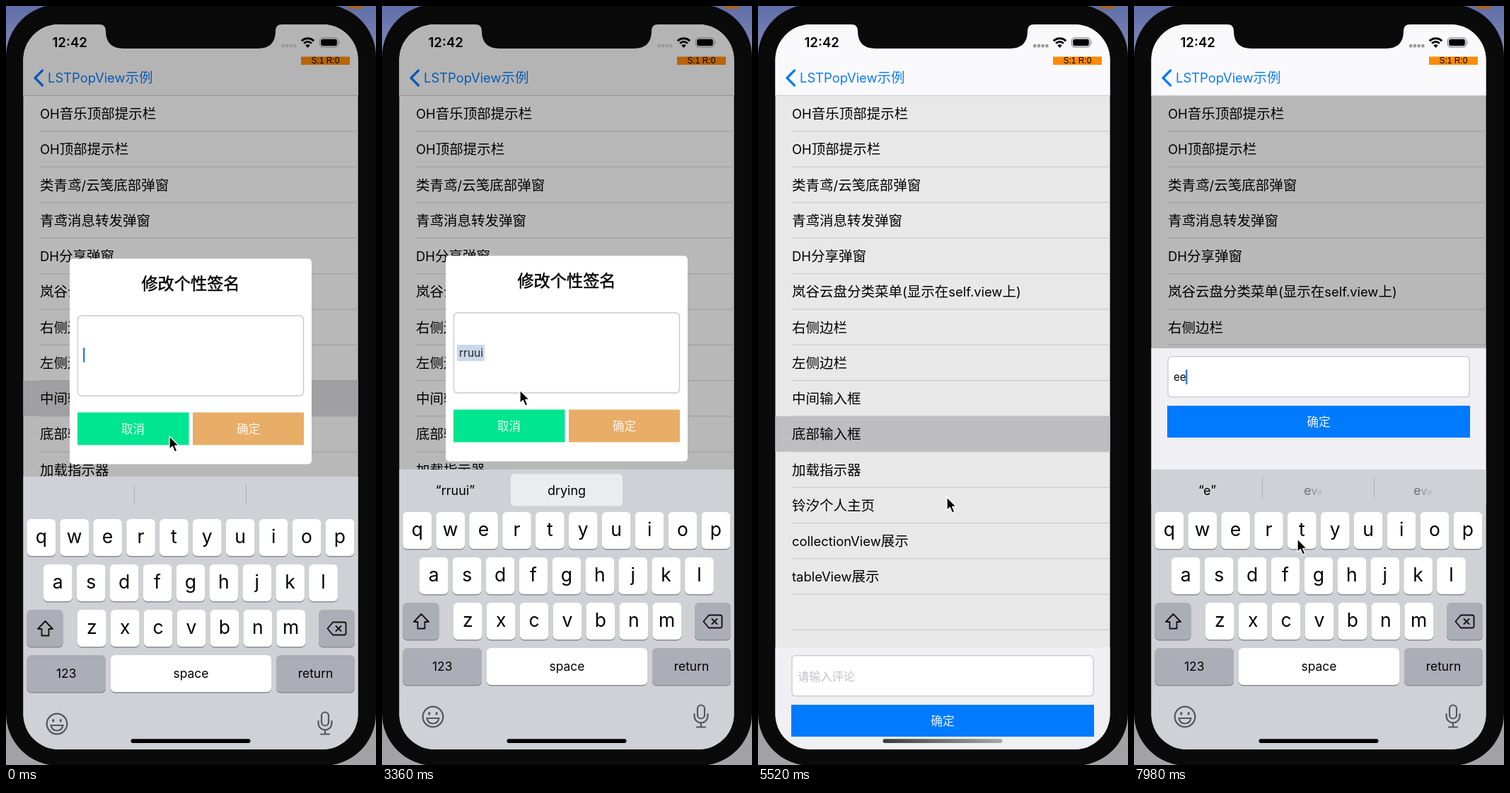
Recreate the animation shown at these times as an HTML page. Size 523x1071 px, loop 8 s.

```html
<!DOCTYPE html>
<html lang="zh-CN">
<head>
<meta charset="utf-8">
<style>
html, body { margin: 0; width: 100%; height: 100%; overflow: hidden; background: #0a0a0a; }
svg { display: block; width: 523px; height: 1071px; }
text { font-family: Inter, "Noto Sans CJK SC", "Noto Sans CJK", "Noto Sans CJK JP", sans-serif; white-space: pre; }
.debug { font-family: "Liberation Sans", Arial, sans-serif; }
</style>
</head>
<body>
<svg id="stage" viewBox="0 0 523 1071" xmlns="http://www.w3.org/2000/svg"></svg>
<script>
const LOOP = 8000, STEP = 60;
const ROW_TOP = 126.5, ROW_H = 50.25, KB_H = 395, DIM = 0.28;

const rows = [
  'OH音乐顶部提示栏', 'OH顶部提示栏', '类青鸢/云笺底部弹窗', '青鸢消息转发弹窗', 'DH分享弹窗',
  '岚谷云盘分类菜单(显示在self.view上)', '右侧边栏', '左侧边栏', '中间输入框', '底部输入框',
  '加载指示器', '铃汐个人主页', 'collectionView展示', 'tableView展示'
];

// time, x, y of the pointer tip
const pointerPath = [
  [0, 231, 607], [800, 205, 520], [1440, 205, 520], [1500, 200, 511],
  [1800, 190, 736], [2160, 190, 736], [2460, 331, 738], [2720, 331, 738],
  [2860, 378, 738], [2980, 378, 738], [3360, 195, 542], [3800, 198, 276],
  [4300, 198, 276], [5200, 255, 600], [5360, 255, 600], [5520, 267, 693],
  [6000, 209, 927], [6500, 180, 800], [7300, 146, 738], [7860, 146, 738], [7980, 231, 752]
];
const typed = [[1860, 'r'], [2100, 'rr'], [2520, 'rru'], [2700, 'rruu'], [2940, 'rruui'], [3900, 'drying']];
const comment = [[7500, 'e'], [7800, 'ee']];

const clamp = v => Math.max(0, Math.min(1, v));
const ramp = (t, start, dur) => clamp((t - start) / dur);
const easeOut = x => 1 - (1 - x) ** 3;
const smooth = x => x * x * (3 - 2 * x);

const rect = (x, y, w, h, fill, r = 0, extra = '') =>
  `<rect x="${x}" y="${y}" width="${w}" height="${h}" rx="${r}" fill="${fill}" ${extra}/>`;
const text = (x, y, size, s, extra = '') => `<text x="${x}" y="${y}" font-size="${size}" ${extra}>${s}</text>`;
const mid = (x, y, size, s, extra = '') => text(x, y, size, s, 'text-anchor="middle" ' + extra);
const line = (x1, y1, x2, y2, color) =>
  `<path d="M${x1} ${y1}L${x2} ${y2}" stroke="${color}" stroke-width="1.2"/>`;

// Latin runs are set a little smaller than the Chinese ones
const mixed = s => s.replace(/[\x20-\x7e]+/g, m => `<tspan font-size="18.4">${m}</tspan>`);

function listMarkup() {
  let out = rect(24, 26, 474, 1024, '#fff');
  out += rect(24, 0, 474, ROW_H, '#d1d1d4', 0, 'id="picked"');
  for (let i = 1; i < 16; i++) {
    const y = ROW_TOP + ROW_H * i;
    out += line(48, y, 498, y, '#d8d8da');
  }
  rows.forEach((s, i) => { out += text(48, 159 + ROW_H * i, 19.5, mixed(s)); });
  return out;
}

function navMarkup() {
  return rect(24, 26, 474, 100, '#f9f9fb') + line(24, 126.3, 498, 126.3, '#cfcfd2') +
    '<path d="M51.5 91L41 101.5L51.5 112" fill="none" stroke="#007aff" stroke-width="3.2" stroke-linecap="round" stroke-linejoin="round"/>' +
    text(59, 108, 19.5, mixed('LSTPopView示例'), 'fill="#0f7cf5"') +
    rect(417, 71.5, 69, 11.5, '#ff8a0a') + mid(451.5, 81.2, 12, 'S:1 R:0', 'class="debug"');
}

function statusMarkup() {
  let out = text(65.5, 58, 18.6, '12:42', 'font-weight="600"');
  for (let i = 0; i < 4; i++) out += rect(389 + i * 5.7, 53.8, 4.4, 4.8, '#9b9b9f', 1.6);
  const arc = (r, w) => {
    const d = r * 0.72;
    return `<path d="M${426.5 - d} ${58 - d}A${r} ${r} 0 0 1 ${426.5 + d} ${58 - d}" fill="none" stroke="#000" stroke-width="${w}"/>`;
  };
  out += arc(12, 3) + arc(7.4, 2.8) + '<path d="M426.5 59L423.3 55.5Q426.5 52.8 429.7 55.5Z"/>';
  out += rect(443.5, 45, 26, 13, 'none', 4, 'stroke="#77777a" stroke-width="1.1"') +
    rect(445.2, 46.7, 22.6, 9.6, '#000', 2.5) + '<path d="M471 49q2 2.500 0 5z" fill="#77777a"/>';
  return out;
}

function dialogMarkup() {
  return rect(90, 352.5, 342, 290, '#fff', 5) +
    mid(261, 395.5, 23.2, '修改个性签名', 'stroke="#000" stroke-width=".5"') +
    rect(101.5, 433, 319, 113, '#fff', 5, 'stroke="#c9c9cb" stroke-width="1.4"') +
    rect(106, 478, 39, 23, '#c9d9ea', 1, 'id="mark"') +
    text(109, 494.5, 15.5, '', 'id="typed" fill="#222"') +
    rect(109, 478, 2.4, 21, '#2f7bdc', 1, 'id="caretA"') +
    '<g id="buttons">' + rect(101, 569.5, 157.5, 46, '#00e58f') + rect(264, 569.5, 157, 46, '#e8ad67') +
    mid(179.5, 598.5, 16.6, '取消', 'fill="#e9fbf3"') + mid(342.5, 598.5, 16.6, '确定', 'fill="#fdf6ee"') + '</g>';
}

function panelMarkup() {
  return rect(24, 0, 474, 220, '#efeff4') +
    rect(48, 11.7, 426, 57, '#fff', 5, 'stroke="#c8c8cc" stroke-width="1.3"') +
    text(56, 46.5, 16.2, '请输入评论', 'id="hint" fill="#c2c2c7"') +
    text(56, 46, 15, '', 'id="comment"') +
    rect(55.5, 30, 2.4, 21, '#2f7bdc', 1, 'id="caretB"') +
    rect(47, 81, 428, 45, '#007aff') + mid(261, 110, 16.8, '确定', 'fill="#eaf3ff"');
}

function key(x, y, w, label, size = 17.4, fill = '#fff') {
  const drop = size > 20 ? 34 : 31.5;
  return rect(x, y + 1.6, w, 52, '#8c8d92', 6) + rect(x, y, w, 52, fill, 6) + mid(x + w / 2, y + drop, size, label);
}

function keyboardMarkup() {
  const grey = '#abaeb6';
  let out = rect(24, 654, 474, 400, '#d0d1d6');
  out += '<g id="bars">' + line(181.5, 665, 181.5, 694, '#b4b5ba') + line(339.5, 665, 339.5, 694, '#b4b5ba') + '</g>';
  out += '<g id="pick">' + rect(182, 660.5, 158, 45, '#ebecef', 5) + mid(261, 690, 18, 'drying') + '</g>';
  out += mid(103.5, 690, 18, '', 'id="quote"') +
    text(240, 690, 18, '', 'id="wordA" fill="#333"') + text(395, 690, 18, '', 'id="wordB" fill="#333"');
  [['qwertyuiop', 29.5], ['asdfghjkl', 53], ['zxcvbnm', 101]].forEach(([letters, x], r) => {
    [...letters].forEach((c, i) => { out += key(x + i * 46.9, 714 + r * 64, 40.6, c, 26.5); });
  });
  out += key(29.5, 842, 51, '', 17, grey) + key(442, 842, 51, '', 17, grey) +
    key(29.5, 906, 111.5, '123', 17.4, grey) + key(148, 906, 227, 'space') + key(382, 906, 111, 'return', 17.4, grey);
  out += '<g fill="none" stroke="#111" stroke-width="1.9" stroke-linejoin="round" stroke-linecap="round">' +
    '<path d="M55.500 858L66 869H60.500V878.500H50.500V869H45Z"/>' +
    '<path d="M462 859.500H478Q480.500 859.500 480.500 862V875Q480.500 877.500 478 877.500H462L454.500 868.500Z"/>' +
    '<path d="M466.500 865L473.500 872M473.500 865L466.500 872"/></g>';
  out += '<g fill="none" stroke="#55575c" stroke-width="2.2" stroke-linecap="round">' +
    '<circle cx="72" cy="1003" r="14.300"/>' +
    '<path d="M63.500 1005H80.500Q79 1012.500 72 1012.500T63.500 1005Z"/>' +
    '<path d="M66.800 997.500V999M77.200 997.500V999" stroke-width="3"/>' +
    '<rect x="446" y="986.500" width="10" height="19" rx="5"/>' +
    '<path d="M441.500 999V1002A9.500 9.500 0 0 0 460.500 1002V999M451 1011.500V1017.500M445 1017.500H457"/></g>';
  return out;
}

const stage = document.getElementById('stage');
stage.innerHTML = `
<defs>
  <linearGradient id="desk" x1="0" y1="0" x2="0" y2="1">
    <stop offset="0" stop-color="#5f6ea8"/><stop offset=".08" stop-color="#8a90bd"/>
    <stop offset=".9" stop-color="#9c9c9f"/><stop offset="1" stop-color="#a4a4a6"/>
  </linearGradient>
  <linearGradient id="bar"><stop offset="0" stop-color="#3a3a3c"/><stop offset="1" stop-color="#aaaaad"/></linearGradient>
  <clipPath id="screen"><rect x="24.5" y="26" width="473" height="1023" rx="50"/></clipPath>
</defs>
${rect(0, 0, 523, 1071, 'url(#desk)')}
${rect(484, 0, 20, 4, '#a8631c')}
${rect(0, -2, 523, 1074, '#0a0a0a', 74)}
<g clip-path="url(#screen)">
  ${listMarkup()}
  ${rect(24, 126, 474, 924, '#000', 0, 'id="dimB"')}
  <g id="panel">${panelMarkup()}</g>
  ${navMarkup()}
  ${rect(24, 26, 474, 1024, '#000', 0, 'id="dimA"')}
  ${statusMarkup()}
  <g id="dialog">${dialogMarkup()}</g>
  <g id="keyboard">${keyboardMarkup()}</g>
  ${rect(176.5, 1034.3, 169, 5.6, '#000', 2.8, 'id="home"')}
</g>
<path d="M132 25H390V26Q381 26 381 35Q381 60 356 60H166Q141 60 141 35Q141 26 132 26Z" fill="#0a0a0a"/>
<g id="pointer"><path d="M0 0V18.500L4.300 14.600L7.400 22L10.800 20.600L7.700 13.400H13.200Z" fill="#000" stroke="#fff" stroke-width="1.300" stroke-linejoin="round"/></g>`;

const el = {};
stage.querySelectorAll('[id]').forEach(n => { el[n.id] = n; });

const fade = (n, o) => n.setAttribute('opacity', o.toFixed(3));
const shift = (n, x, y) => n.setAttribute('transform', `translate(${Math.round(x)} ${Math.round(y)})`);
const valueAt = (list, t) => list.reduce((s, [at, v]) => t >= at ? v : s, '');

function blink(t, start) {
  if (t < start) return 1;
  const u = (t - start) % 1000;
  return u < 920 ? 1 - ramp(u, 540, 160) : ramp(u, 920, 80);
}

function pointerAt(t) {
  let i = 0;
  while (i < pointerPath.length - 2 && t > pointerPath[i + 1][0]) i++;
  const [t0, x0, y0] = pointerPath[i], [t1, x1, y1] = pointerPath[i + 1];
  const k = smooth(ramp(t, t0, t1 - t0));
  return [x0 + (x1 - x0) * k, y0 + (y1 - y0) * k];
}

// letters of a suggestion appear one after another, growing
function growing(word, p) {
  return [...word].map((c, i) => {
    const o = clamp(p - i * 0.2);
    return `<tspan fill-opacity="${o.toFixed(2)}" font-size="${(18 * Math.min(1, 0.55 + 0.75 * o)).toFixed(1)}">${c}</tspan>`;
  }).join('');
}

function draw(t) {
  const rise = 1 - easeOut(ramp(t, 0, 200));
  const leave = easeOut(ramp(t, 3900, 475));
  const second = t >= 5000;
  const kb = second ? KB_H * (1 - easeOut(ramp(t, 5856, 475))) : rise * 9.5 + leave * KB_H;
  shift(el.keyboard, 0, kb);

  const open = 1 - ramp(t, 3900, 200);
  shift(el.dialog, 0, rise * 4 + leave * 154);
  fade(el.dialog, open);
  el.buttons.style.filter = open < 1 ? `grayscale(${(1 - open).toFixed(2)})` : 'none';
  fade(el.dimA, DIM * (1 - ramp(t, 3900, 225)));

  const entered = easeOut(ramp(t, 5400, 260));
  shift(el.panel, 0, 1049 - 171 * entered - (second ? KB_H - kb : 0));
  fade(el.dimB, DIM * ramp(t, 5400, 375));

  el.picked.setAttribute('y', ROW_TOP + ROW_H * (second ? 9 : 8));
  fade(el.picked, second ? (t >= 5280 ? 1 - ramp(t, 5640, 320) : 0) : 0.72 * (1 - ramp(t, 0, 360)));

  const word = valueAt(typed, t), marked = t >= 3000 && t < 3900;
  el.typed.textContent = word;
  fade(el.mark, marked ? 1 : 0);
  el.caretA.setAttribute('x', 109 + (word ? el.typed.getComputedTextLength() : 0));
  fade(el.caretA, t >= 3000 ? 0 : word ? 1 : blink(t, 600));

  const note = valueAt(comment, t);
  el.comment.textContent = note;
  fade(el.hint, note ? 0 : 1);
  el.caretB.setAttribute('x', 55.5 + (note ? el.comment.getComputedTextLength() : 0));
  fade(el.caretB, t < 5856 ? 0 : note ? 1 : blink(t, 5900));

  const corrected = t >= 3000 && !second;
  const quoted = second ? (t >= 7560 ? 'e' : '') : corrected ? 'rruui' : word;
  el.quote.textContent = quoted && `“${quoted}”`;
  fade(el.pick, corrected ? 1 : 0);
  fade(el.bars, corrected ? 0 : 1);
  const p = second ? Math.max(0, (t - 7860) / 200) : 0;
  el.wordA.innerHTML = p ? growing('eve', p) : '';
  el.wordB.innerHTML = p ? growing('even', p) : '';

  el.home.setAttribute('fill', t >= 5460 && t < 5700 ? 'url(#bar)' : '#000');
  shift(el.pointer, ...pointerAt(t));
}

const begin = performance.now();
function tick() {
  const t = (performance.now() - begin) % LOOP;
  draw(Math.floor(t / STEP) * STEP);
  requestAnimationFrame(tick);
}
tick();
</script>
</body>
</html>
```
